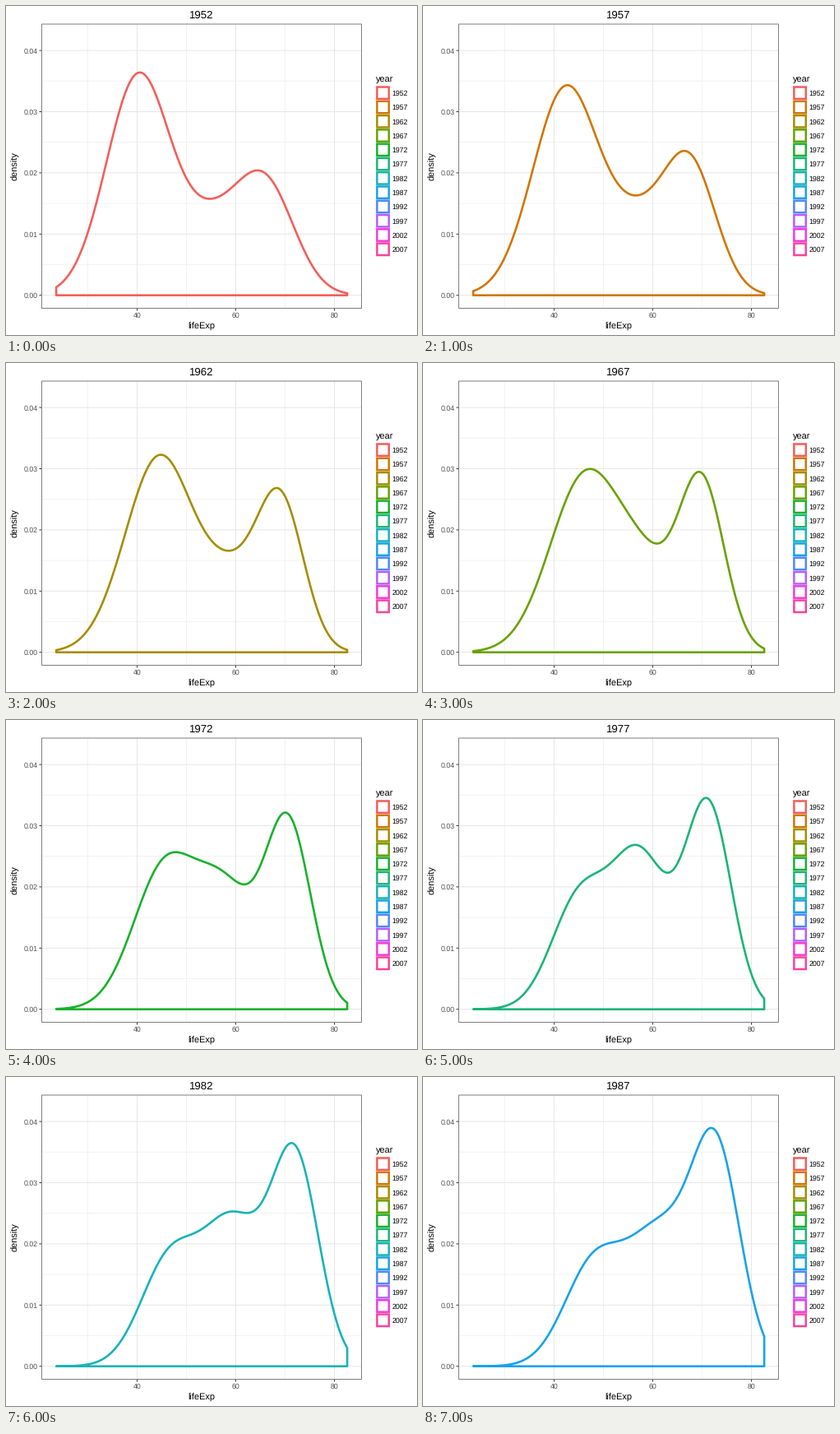
These frames come from a looping animation (500 px wide and 400 px high, 8 s). A matplotlib script:

```python
import numpy as np
import matplotlib.pyplot as plt
from matplotlib.animation import FuncAnimation
from matplotlib.patches import Polygon, Rectangle

W, H, DPI = 500, 400, 100
PX = 72 / DPI  # points per pixel
plt.rcParams["font.family"] = "Liberation Sans"
plt.rcParams["text.hinting"] = "none"

YEARS = range(1952, 2008, 5)
SHOWN = YEARS[:8]
COLORS = ["#f35e5a", "#d27500", "#a68c00", "#68a200", "#17b12b", "#1ab479",
          "#17b3b7", "#17a2ea", "#5086ff", "#b35eff", "#f03ddd", "#fb429b"]

# Key poses: low, middle and high hump as (height x 1e-4, centre, spread)
POSES = {
    1952: [(359, 40.3, 6.5), (97, 55.0, 6.0), (181, 65.9, 5.9)],
    1962: [(320, 44.6, 7.0), (104, 59.5, 5.5), (242, 69.1, 4.7)],
    1967: [(288, 46.4, 7.2), (106, 58.8, 5.7), (276, 69.9, 4.6)],
    1977: [(180, 45.2, 5.7), (244, 57.4, 5.65), (332, 71.2, 4.7)],
    1987: [(163, 48.0, 6.0), (210, 61.5, 6.5), (338, 72.9, 4.9)],
}
LIFE = np.linspace(23.599, 82.603, 300)
LEFT, RIGHT, TOP, BOTTOM = 43.5, 432.5, 22.0, 367.5


def px_x(life):
    return 159.5 + 6 * (life - 40)


def px_y(density):
    return 351.7 - 7440 * density


def humps(year):
    """Hump parameters, blended linearly between the key poses."""
    tracks = np.reshape(list(POSES.values()), (len(POSES), -1)).T
    blend = [np.interp(year, list(POSES), track) for track in tracks]
    return np.reshape(blend, (-1, 3))


def outline(year):
    density = sum(h * 1e-4 * np.exp(-((LIFE - c) / s) ** 2 / 2)
                  for h, c, s in humps(year))
    x, base = px_x(LIFE), px_y(0)
    top = np.column_stack([x, px_y(density)])
    return np.vstack([top, [x[-1], base], [x[0], base]])


fig = plt.figure(figsize=(W / DPI, H / DPI), dpi=DPI, facecolor="white")
ax = fig.add_axes([0, 0, 1, 1])
ax.set_xlim(0, W)
ax.set_ylim(H, 0)
ax.axis("off")


def line(x, y, color, z=1):
    ax.plot(x, y, color=color, lw=PX, zorder=z, solid_capstyle="butt",
            snap=False)


def box(x, y, w, h, color, width, z=3):
    ax.add_patch(Rectangle((x, y), w, h, fill=False, ec=color, lw=width * PX,
                           joinstyle="miter", snap=False, zorder=z))


def label(x, y, text, size, color="black", **kw):
    return ax.text(x, y, text, fontsize=size * PX, color=color,
                   va="baseline", **kw)


# Grid, ticks and tick labels
MAJOR, MINOR, TICK, GREY = "#e6e6e6", "#f2f2f2", "#333333", "#4d4d4d"
for life in range(30, 90, 10):
    x = px_x(life)
    major = life % 20 == 0
    if major:
        line([x, x], [BOTTOM, BOTTOM + 3], TICK)
        label(x, 379.1, str(life), 8.8, GREY, ha="center")
    if x < RIGHT:
        line([x, x], [TOP, BOTTOM], MAJOR if major else MINOR, 1 + major)
for k in range(9):
    y = px_y(k * 0.005)
    major = k % 2 == 0
    line([LEFT, RIGHT], [y, y], MAJOR if major else MINOR, 1 + major)
    if major:
        line([LEFT - 3, LEFT], [y, y], TICK)
        label(38.4, y + 3.4, f"{k * 0.005:.2f}", 8.8, GREY, ha="right")

box(LEFT, TOP, RIGHT - LEFT, BOTTOM - TOP, "#7f7f7f", 1, z=6)
label(238, 393, "lifeExp", 11, ha="center")
label(14, 194.7, "density", 11, ha="center", rotation=90,
      rotation_mode="anchor")

# Legend
label(449.7, 93, "year", 11)
for k, (year, color) in enumerate(zip(YEARS, COLORS)):
    y = 105.7 + 17.28 * k
    box(451.4, y - 7.2, 14.4, 14.4, color, 2.5)
    label(469.8, y + 3.3, str(year), 8.8)

title = label(238, 15.2, "", 13.2, ha="center")
curve = Polygon(outline(SHOWN[0]), closed=True, fill=False, lw=2.6 * PX,
                joinstyle="round", snap=False, zorder=5)
ax.add_patch(curve)


def draw(k):
    curve.set_xy(outline(SHOWN[k]))
    curve.set_edgecolor(COLORS[k])
    title.set_text(str(SHOWN[k]))
    return curve, title


anim = FuncAnimation(fig, draw, frames=len(SHOWN), interval=1000,
                     repeat=True, repeat_delay=0)
plt.show()
```
